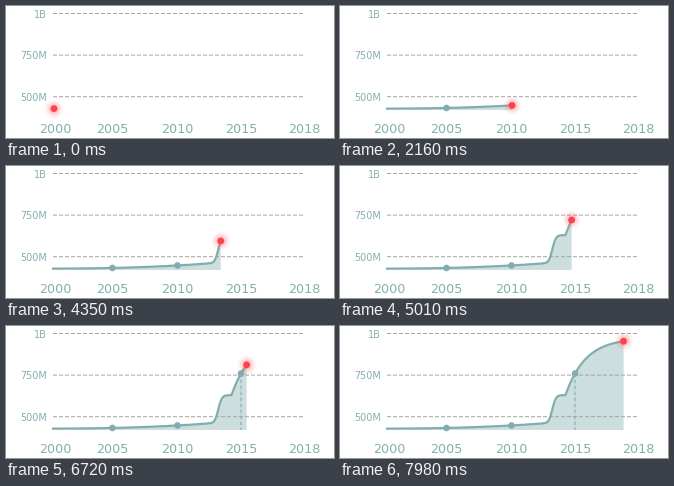
These frames come from a looping animation (328x132 px, 8 s). A matplotlib script:

```python
import numpy as np
import matplotlib.pyplot as plt
from matplotlib.animation import FuncAnimation
from matplotlib.patches import Circle

W, H, DPI = 328, 132, 100
LOOP, STEP, TICK = 8000, 20, 30
LEFT, BASE = 46, 104
TEAL, LABEL, MARK, RED = "#82adae", "#84afb1", "#82abb5", "#fb4350"

# Legs between rests: start ms, end ms, from x, to x, easing power
LEGS = [(200, 850, 48, 107, 1),
        (1455, 2160, 107, 172, 1),
        (3035, 5150, 172, 235.2, 1),
        (6300, 7980, 235.2, 283.6, 1.3)]


def height(x):
    """Slow growth, one sharp step, then a saturating climb."""
    x = np.asarray(x, float)
    slow = 5 * np.clip((x - LEFT) / 155, 0, 1) ** 2.2
    step = 28.5 / (1 + np.exp((212.3 - x) / 1.8))
    climb = 57 * (1 - np.exp(-np.maximum(x - 225.5, 0) / 20))
    return 102.6 - slow - step - climb


xs = np.linspace(LEFT, 285, 1000)
ys = height(xs)
arc = np.append(0, np.cumsum(np.hypot(np.diff(xs), np.diff(ys))))


def dot_x(t):
    """Travel along the curve by arc length, resting between legs."""
    x = LEGS[0][2]
    for start, end, x0, x1, power in LEGS:
        if t >= start:
            u = min((t - start) / (end - start), 1) ** power
            s0, s1 = np.interp([x0, x1], xs, arc)
            x = np.interp(s0 + u * (s1 - s0), arc, xs)
    return x


def px(n):
    return n * 72 / DPI


fig = plt.figure(figsize=(W / DPI, H / DPI), dpi=DPI, facecolor="white")
ax = fig.add_axes([0, 0, 1, 1])
ax.axis("off")


def dashes(x, y, color, on, off, z):
    return ax.plot(x, y, color=color, lw=px(1), zorder=z, snap=False,
                   dashes=(on, off), dash_capstyle="butt")[0]


def label(x, y, text, size, ha):
    ax.text(x, y, text, fontsize=px(size), color=LABEL, ha=ha,
            va="baseline", family="DejaVu Sans")


for i, text in enumerate(("1B", "750M", "500M")):
    y = 7.5 + 41.6 * i
    dashes([47, 297], [y, y], "#a3a5a6", 4, 2, 1)
    label(41, y + 4, text, 9.7, "right")

for x, year in zip((49.3, 106.5, 171.5, 235, 298), (2000, 2005, 2010, 2015, 2018)):
    label(x, 127.4, str(year), 12.8, "center")

area = ax.fill([LEFT] * 3, [BASE] * 3, color=TEAL, alpha=0.4, lw=0, zorder=2)[0]
line, = ax.plot([], [], color=TEAL, lw=px(2.2), zorder=4,
                solid_capstyle="butt", solid_joinstyle="round")
drop = dashes([235, 235], [height(235), BASE], "#7fa5a9", 3.6, 2.4, 3)
marks = [ax.add_patch(Circle((x, height(x)), 3.3, fc=MARK, lw=0, zorder=5))
         for x in (106.5, 171.5, 235)]

# Soft red halo around the moving dot
R = 12
g = np.linspace(-R, R, 49)
radius = np.hypot(*np.meshgrid(g, g))
halo = np.empty(radius.shape + (4,))
halo[..., :3] = (1, 0.4, 0.4)
halo[..., 3] = 0.58 * np.exp(-(radius / 6) ** 2) * np.clip((R - radius) / 4, 0, 1)
glow = ax.imshow(halo, aspect="auto", zorder=6, interpolation="bilinear")
dot = ax.add_patch(Circle((48, 102), 3.4, fc=RED, lw=0, zorder=7))

ax.set_xlim(0, W)
ax.set_ylim(H, 0)


def update(i):
    t = i * STEP // TICK * TICK
    x = dot_x(t)
    y = height(x)
    past = xs < x
    px_, py_ = np.append(xs[past], x), np.append(ys[past], y)
    line.set_data(px_, py_)
    area.set_xy(np.column_stack([np.append(px_, [x, LEFT]),
                                 np.append(py_, [BASE, BASE])]))
    for m in marks:
        m.set_visible(x > m.center[0] + 0.6)
    drop.set_visible(x > 235.1)
    dot.center = (x, y)
    r = R * (0.96 + 0.04 * np.cos(2 * np.pi * t / 1350))
    glow.set_extent((x - r, x + r, y + r, y - r))
    return line, area, drop, glow, dot, *marks


anim = FuncAnimation(fig, update, frames=LOOP // STEP, interval=STEP,
                     repeat=True, repeat_delay=0, blit=False)
plt.show()
```
